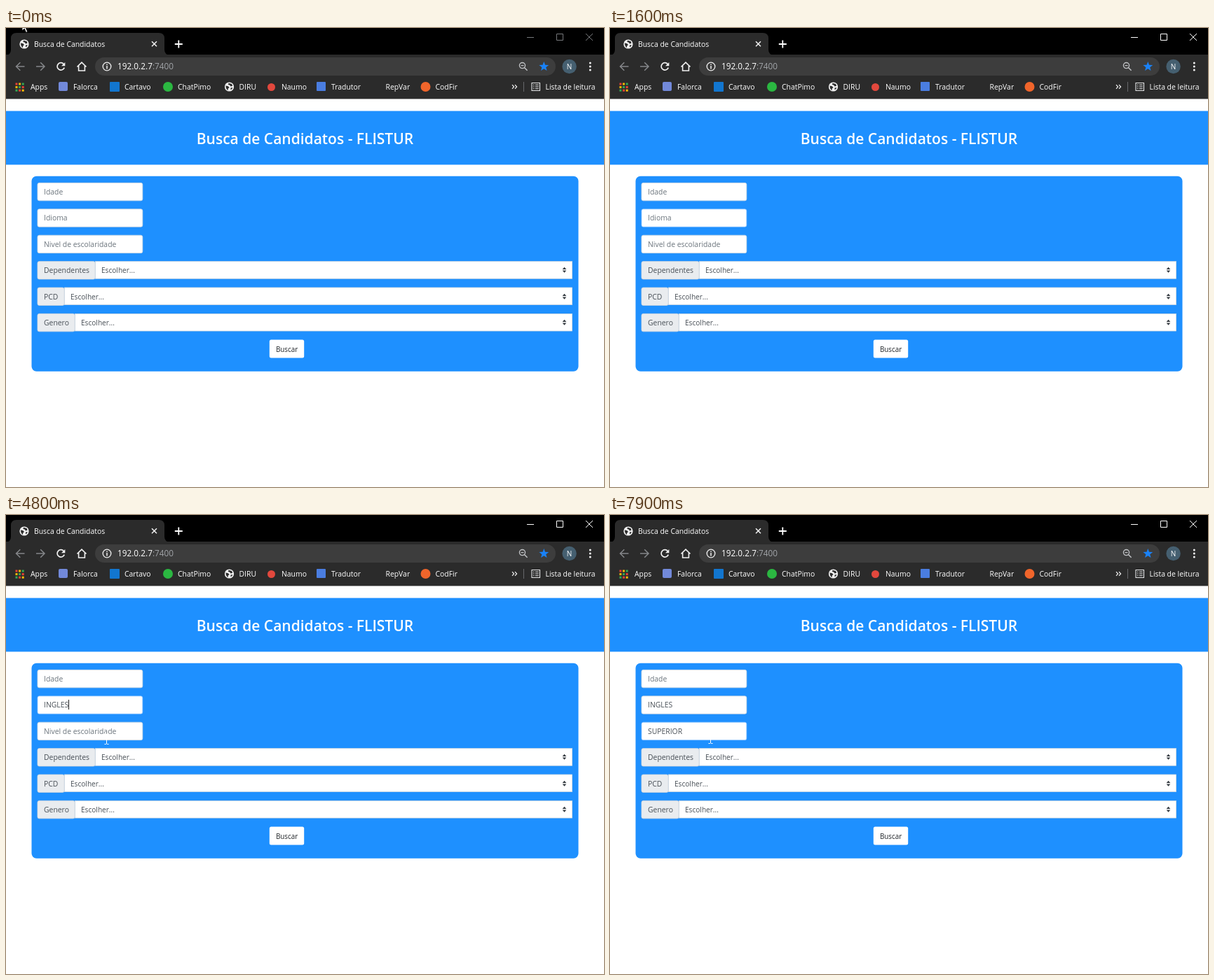
Write an HTML page that moves like this. It is 853x656 px and loops after 8 s.

```html
<!DOCTYPE html>
<html lang="pt">
<head>
<meta charset="utf-8">
<title>Busca de Candidatos</title>
<style>
  html, body { margin: 0; width: 100%; height: 100%; overflow: hidden; background: #fff; }
  svg { display: block; width: 100%; height: 100%; }
  text { font-family: "Open Sans", "Noto Sans", sans-serif; font-size: 10.4px; white-space: pre; }
  .line { fill: none; stroke-linecap: butt; }
</style>
</head>
<body>
<svg id="stage" viewBox="0 0 853 656" xmlns="http://www.w3.org/2000/svg"></svg>
<script>
const LOOP = 8000, STEP = 100;
const BLUE = "#1e90ff", BAR = "#2b2b2b", INK = "#495057", HINT = "#6c757d", EDGE = "#ced4da";

const rect = (x, y, w, h, fill, more = "") =>
  `<rect x="${x}" y="${y}" width="${w}" height="${h}" fill="${fill}" ${more}/>`;
const dot = (x, y, r, fill, more = "") => `<circle cx="${x}" cy="${y}" r="${r}" fill="${fill}" ${more}/>`;
const line = (d, color, w = 1.3, more = "") =>
  `<path class="line" d="${d}" stroke="${color}" stroke-width="${w}" ${more}/>`;
const shape = (d, fill, more = "") => `<path d="${d}" fill="${fill}" ${more}/>`;
const label = (x, y, s, fill, size = 10.4, more = "") =>
  `<text x="${x}" y="${y}" fill="${fill}" style="font-size:${size}px" ${more}>${s}</text>`;

const globe = (x, y) => `<g transform="translate(${x} ${y})">` + dot(0, 0, 6.6, "#f1f1f1") +
  shape("M-5-1.5L-1.5-.8L0 1.2L-1.8 2.4L-2 5.2Q-5 3.4-5-1.5ZM-1-5.2L3.6-4L4.6-1.2L2-.4L.6-2.6L-1.6-3ZM2 1.6L4.8 1.2Q4.2 3.8 2 4.6Z", BAR) + "</g>";

function star(x, y, r) {
  const pts = [];
  for (let i = 0; i < 10; i++) {
    const a = Math.PI * (i / 5 - 0.5), k = i % 2 ? r * 0.42 : r;
    pts.push((x + k * Math.cos(a)).toFixed(2) + " " + (y + k * Math.sin(a)).toFixed(2));
  }
  return shape("M" + pts.join("L") + "Z", "#1a82f7");
}

function tabStrip() {
  return rect(0, 0, 853, 39, "#000") +
    shape("M0 39Q7 38 7 31V15Q7 7 15 7H218Q226 7 226 15V31Q226 38 234 39Z", BAR) +
    globe(26, 23) + label(40, 26.6, "Busca de Candidatos", "#fff") +
    line("M208 19.2L215 26.2M215 19.2L208 26.2", "#f1f1f1", 1.5) +
    line("M246.3 17.5V28.5M240.8 23H251.8", "#fff", 1.8) +
    `<g id="controls">${line("M743 13.5H753M785.5 8.5H794.5V17.5H785.5ZM827 8L837 18M837 8L827 18", "currentColor", 1)}</g>`;
}

function toolbar() {
  const grey = "#85878a", white = "#f1f1f1";
  let s = rect(0, 38, 853, 63.4, BAR) + rect(127, 42, 657, 26, "#3d3d3d", 'rx="13"') +
    line("M26.5 55H14.8M20.3 49.2L14.5 55L20.3 60.8", grey, 1.5) +
    line("M43 55H54.8M49.2 49.2L55 55L49.2 60.8", grey, 1.5) +
    line("M82.6 52A5.2 5.2 0 1 0 83.2 56.6", white, 1.7) + shape("M84.3 49V54.3H79Z", white) +
    line("M101.5 55.5L108 49.2L114.5 55.5M103.6 54V61H112.4V54", white, 1.6) +
    dot(144, 55, 5.8, "none", `stroke="${white}" stroke-width="1.3"`) +
    line("M144 54V58.4M144 51.4V52.9", white, 1.5) +
    label(159, 59.2, '192.0.2.7<tspan fill="#a0a3a7">:7400</tspan>', "#fff", 11.8) +
    dot(736.5, 53.6, 4.1, "none", 'stroke="#c4c6c9" stroke-width="1.3"') +
    line("M734.5 53.6H738.5M739.6 56.7L743.6 60.7", "#c4c6c9", 1.4) +
    star(767.3, 55.2, 7.3) + dot(803.6, 55, 10.2, "#455f70") +
    label(803.6, 58.7, "N", "#fff", 10, 'text-anchor="middle"');
  for (const y of [50, 55, 60]) s += dot(833.3, y, 1.5, white);
  return s;
}

function bookmarks() {
  const names = [[35, "Apps"], [96, "Falorca"], [169, "Cartavo"], [245, "ChatPimo"], [332.5, "DIRU"],
    [393, "Naumo"], [464, "Tradutor"], [541.5, "RepVar"], [612.5, "CodFir"], [769.5, "Lista de leitura"]];
  const hues = ["#ea4335", "#fbbc05", "#34a853"];
  let s = "";
  for (let i = 0; i < 9; i++) {
    s += rect(13.5 + (i % 3) * 4.6, 78.5 + Math.floor(i / 3) * 4.6, 3, 3, hues[(i + Math.floor(i / 3)) % 3]);
  }
  s += rect(75, 77, 13, 13, "#7289da", 'rx="2"') + rect(148, 77, 14, 14, "#1276cf", 'rx="1"') +
    dot(231, 84, 7, "#2bb741") + globe(318.5, 84) + dot(378.5, 84.5, 5.5, "#e2483d") +
    rect(443, 77, 13, 13, "#4a7de0", 'rx="1"') + dot(598.5, 84, 7, "#f0652b");
  for (const [x, name] of names) s += label(x, 87.7, name, "#fff");
  return s + line("M722 81.2L724.6 84L722 86.8M726 81.2L728.6 84L726 86.8", "#f1f1f1", 1.2) +
    rect(738, 77, 1, 14, "#66686b") +
    line("M750 78.5H761.5V89.5H750ZM752 81.3H753.5M755 81.3H759.8M752 84H753.5M755 84H759.8M752 86.7H753.5M755 86.7H759.8", "#e4e5e7", 1.1);
}

const rowTop = i => 221 + 37.4 * i;
const baseline = i => Math.round(rowTop(i)) + 17;
const hints = ["Idade", "Idioma", "Nivel de escolaridade"];

// A bordered box whose border lies inside the given bounds.
const box = (x, y, w, h, fill, more = "") =>
  rect(x + 0.35, y + 0.35, w - 0.7, h - 0.7, fill, `stroke="${EDGE}" stroke-width=".7" ${more}`);

function input(i) {
  return box(44.6, rowTop(i), 150.6, 26.2, "#fff", `id="box${i}" rx="2.5"`) +
    label(54, baseline(i), hints[i], HINT, 10.4, `id="field${i}"`);
}

function select(i, name, split) {
  const y = rowTop(i), m = Math.round(y) + 13;
  return box(44.6, y, split - 44.6, 26.2, "#e9ecef", 'rx="2.5"') +
    box(split - 0.5, y, 808.5 - split, 25.4, "#fff") +
    label(54, baseline(i), name, INK) + label(split + 8.5, baseline(i), "Escolher...", INK, 10.1) +
    shape(`M793.7 ${m - 1}L796.5 ${m - 4.2}L799.3 ${m - 1}ZM793.7 ${m + 0.5}L796.5 ${m + 3.7}L799.3 ${m + 0.5}Z`, "#343a40");
}

function page() {
  return rect(0, 101, 853, 555, "#fff") + rect(0, 118.6, 853, 76.8, BLUE) +
    label(426.5, 166, "Busca de Candidatos - FLISTUR", "#fff", 21, 'font-weight="600" text-anchor="middle"') +
    rect(36.5, 211.8, 780, 279, BLUE, 'rx="7"') +
    hints.map((_, i) => input(i)).join("") +
    select(3, "Dependentes", 127.5) + select(4, "PCD", 83.5) + select(5, "Genero", 98.5) +
    rect(375.8, 445.4, 49.4, 26.2, "#fff", 'rx="2.5"') +
    label(400.6, 462.6, "Buscar", "#212529", 9.9, 'text-anchor="middle"');
}

const stage = document.getElementById("stage");
stage.innerHTML = page() + tabStrip() + toolbar() + bookmarks() +
  rect(0, 0, 1, 14, "#222", 'id="caret"') +
  `<g id="arrow">${shape("M0 0V14L3.3 11L5.6 16.4L7.8 15.4L5.5 10.2H10Z", "#fff", 'stroke="#000" stroke-width=".9"')}</g>` +
  `<g id="beam">${line("M-3 -7.5H-1L0 -6.8L1 -7.5H3M0 -7V7M-3 7.5H-1L0 6.8L1 7.5H3", "#fff", 1)}</g>`;
const el = id => document.getElementById(id);

// Each session: field, word, focus time, then one time per key press.
const sessions = [
  { field: 1, word: "INGLES", times: [1100, 2100, 2200, 3200, 3400, 3500, 3800] },
  { field: 2, word: "SUPERIOR", times: [5000, 5700, 5800, 6300, 6400, 6800, 7000, 7200, 7300] }
];

// Pointer stops: time, x, y.
const stops = [[200, 23, -10], [600, 224, 408], [900, 150, 271], [4200, 150, 271], [4300, 288, 247],
  [4500, 150, 58], [4600, 84, 130], [4800, 143.5, 320], [7800, 143.5, 320], [7900, 143.5, 319]];

function pointerAt(t) {
  if (t <= stops[0][0]) return stops[0].slice(1);
  const n = stops.findIndex(s => s[0] > t);
  if (n < 0) return stops[stops.length - 1].slice(1);
  const [t0, x0, y0] = stops[n - 1], [t1, x1, y1] = stops[n];
  const k = (t - t0) / (t1 - t0);
  return [x0 + (x1 - x0) * k, y0 + (y1 - y0) * k];
}

function overText(x, y) {
  const inside = (l, top, r, b) => x >= l && x <= r && y >= top && y <= b;
  return inside(127, 42, 783, 68) || [0, 1, 2].some(i => inside(45, rowTop(i), 195, rowTop(i) + 26));
}

function drawPointer(t) {
  const [x, y] = pointerAt(t), text = overText(x, y);
  for (const [id, on] of [["arrow", !text], ["beam", text]]) {
    el(id).setAttribute("transform", `translate(${x} ${y})`);
    el(id).style.display = on ? "" : "none";
  }
}

function drawFields(t) {
  const active = sessions.filter(s => t >= s.times[0]).pop();
  for (const s of sessions) {
    const count = s.times.filter(k => k <= t).length - 1;
    const field = el("field" + s.field);
    field.textContent = count > 0 ? s.word.slice(0, count) : hints[s.field];
    field.setAttribute("fill", count > 0 ? INK : HINT);
    el("box" + s.field).setAttribute("stroke", s === active ? "#80bdff" : EDGE);
    if (s !== active) continue;
    const width = count > 0 ? field.getComputedTextLength() : 0;
    el("caret").setAttribute("x", Math.floor(54 + width));
    el("caret").setAttribute("y", baseline(s.field) - 11);
    el("caret").style.display = (t - s.times[count]) % 1000 < 500 ? "" : "none";
  }
  if (!active) el("caret").style.display = "none";
}

function draw(time) {
  const t = Math.floor((time % LOOP) / STEP) * STEP;
  el("controls").style.color = t < 1100 ? "#77797c" : "#fff";
  drawFields(t);
  drawPointer(t);
}

const start = performance.now();
function tick() {
  draw(performance.now() - start);
  requestAnimationFrame(tick);
}
tick();
</script>
</body>
</html>
```
